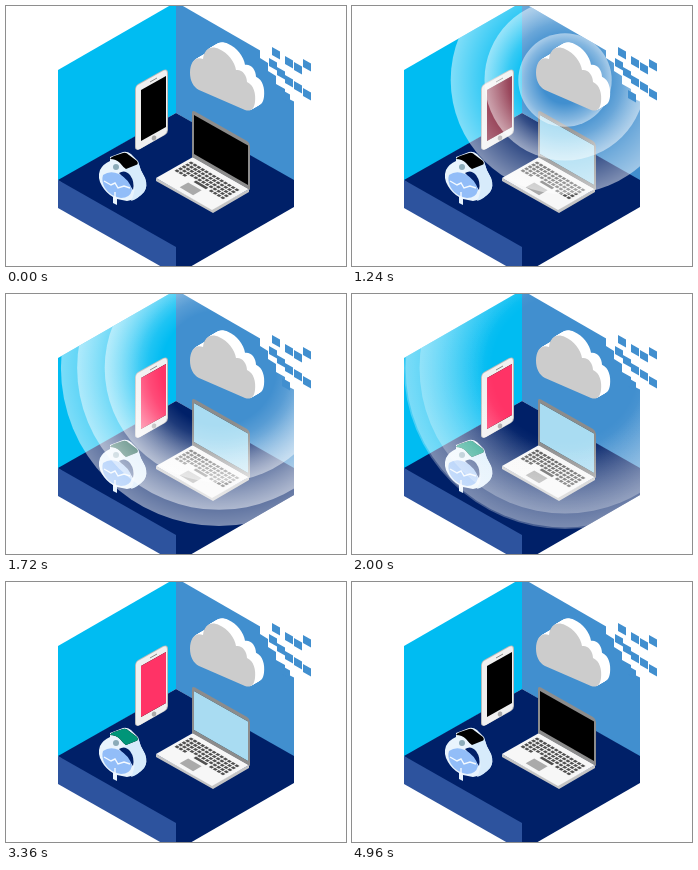
Animation of 340x260 px, one loop 5000 ms. Source, as an HTML page with a canvas:

```html
<!DOCTYPE html>
<html>
<head>
<meta charset="utf-8">
<style>
html, body { margin: 0; width: 100%; height: 100%; overflow: hidden; background: #fff; }
canvas { display: block; }
</style>
</head>
<body>
<canvas id="stage" width="340" height="260"></canvas>
<script>
const ctx = document.getElementById('stage').getContext('2d');
const LOOP = 5000, WAVE = { x: 213, y: 74, radius: 161 };
const WALL = '#418fcf', NAVY = '#002068';
const clamp = x => Math.max(0, Math.min(1, x));
const ramp = (t, from, to) => clamp((t - from) / (to - from));

function fill(path, color) {
  ctx.fillStyle = color;
  ctx.fill(new Path2D(path));
}

function line(path, color, width = 1) {
  ctx.strokeStyle = color;
  ctx.lineWidth = width;
  ctx.stroke(new Path2D(path));
}

// Black screen with its lit colour faded in and out
function screen(path, color, t, on, off, length) {
  fill(path, '#000');
  ctx.globalAlpha = ramp(t, on, on + length) - ramp(t, off, off + length);
  fill(path, color);
  ctx.globalAlpha = 1;
}

function room() {
  fill('M52 64L170-4V107L52 175Z', '#00bcf2');
  fill('M170-4L288 64V175L170 107Z', WALL);
  fill('M170 107L288 174V201L170 269L52 174Z', NAVY);
  fill('M52 174L170 241V269L52 202Z', '#2d539e');
}

function phone(t) {
  fill('M129 83Q129 80 132 78L157 64Q162 62 162 67V124Q162 127 159 129L134 143Q129 145 129 141Z', '#b9b9b9');
  fill('M130 83Q130 80 133 78.500L157 65Q161 63 161 67V124Q161 127 158 129L134 143Q130 145 130 141Z', '#f0f0f0');
  screen('M135 84L160 70V121L135 135Z', '#ff3366', t, 1080, 4040, 320);
  line('M144 76L151 72', '#888');
  ctx.beginPath();
  ctx.ellipse(148, 132, 2.2, 2.6, 0.3, 0, 7);
  ctx.fillStyle = '#aaa';
  ctx.fill();
}

function laptop(t) {
  fill('M150 172L206 203L243 183V186L207 207L150 175Z', '#c4c4c4');
  fill('M187 151L243 183L206 204L150 172Z', '#f7f7f7');
  ctx.save();
  ctx.transform(56, 33, -37, 21, 187, 151);
  ctx.fillStyle = '#505050';
  for (let row = 0; row < 5; row++)
    for (let col = 0; col < 13; col++)
      if (row < 4 || col < 3 || col > 8 || col === 5)
        ctx.fillRect(0.05 + col * 0.068, 0.13 + row * 0.095, row === 4 && col === 5 ? 0.22 : 0.05, 0.065);
  ctx.fillStyle = '#aaa';
  ctx.fillRect(0.35, 0.66, 0.24, 0.23);
  ctx.restore();
  fill('M186 107Q186 104 189 105.500L241 135Q244 137 244 140V184L186 151Z', '#8c8c8c');
  screen('M188 109L242 139.500V179L188 148Z', '#a9dcf2', t, 880, 3840, 300);
}

function watch(t) {
  fill('M104 151L117 146Q121 145 125 148L132 155Q134 164 139 172Q142 180 138 186Q132 193 121 195L111 193V199L107 197V191Q100 187 96 180Q91 172 94 164Q97 158 104 155Z', '#e9f4fd');
  fill('M132 156Q134 164 139 172Q142 180 138 186Q132 193 125 195Q132 181 125 171Q120 167 119 163Z', '#d7ebfb');
  fill('M113 167Q119 163 124 169Q129 176 127 184Q122 176 113 167Z', NAVY);
  fill('M97 169Q104 164 113 168Q124 174 126 184Q124 192 115 192Q104 190 99 182Q95 175 97 169Z', '#92bdf8');
  line('M98 175L105 179L109 177L112 182L118 180L124 182M109 186V193', '#f4faff', 1.4);
  screen('M104 153Q105 151 108 150L117 147Q120 146 123 149L131 155Q133 158 130 159L120 163Q117 161 114 157Q110 153 104 153Z', '#009578', t, 1560, 4520, 320);
  ctx.beginPath();
  ctx.arc(110, 161, 3, 0, 7);
  ctx.fillStyle = '#8babb9';
  ctx.fill();
}

function waves(t) {
  const opacity = t < 1700 ? 1 : t < 2320 ? 1 - 0.9 * ramp(t, 1700, 2320) : 0.1 * (1 - ramp(t, 2320, 2840));
  ctx.save();
  ctx.clip(new Path2D('M52 64L170-4L288 64V201L170 269L52 202Z'));
  ctx.globalAlpha = opacity;
  for (let ring = 0; ring < 3; ring++) {
    const p = ramp(t - ring * 240, 130, 1870);
    const r = WAVE.radius * (1 - Math.cos(Math.PI * p)) / 2;
    if (r < 1) continue;
    const glow = ctx.createRadialGradient(WAVE.x, WAVE.y, r * 0.5, WAVE.x, WAVE.y, r);
    glow.addColorStop(0, 'rgba(255,255,255,0)');
    glow.addColorStop(1, 'rgba(255,255,255,.5)');
    ctx.fillStyle = glow;
    ctx.beginPath();
    ctx.arc(WAVE.x, WAVE.y, r, 0, 7);
    ctx.fill();
  }
  ctx.restore();
}

function tiles() {
  fill('M254 43V52L262 57V65L270 70V78L279 83V91L289 96V62Z', '#fff');
  const corners = [[266, 41], [263, 52], [271, 61], [279, 50], [288, 56], [297, 53], [279, 69], [288, 75], [276, 84], [297, 82]];
  for (const [x, y] of corners) fill(`M${x} ${y}l8 4.600v8l-8-4.600Z`, WALL);
}

function cloud() {
  const face = 'M184 67C184 55 190 50 197 53C198 43 205 39 213 43C222 47 229 56 230 64C236 63 241 69 241 76C248 79 250 88 249 96C248 103 245 106 239 104L193 84C187 81 184 74 184 67Z';
  for (let depth = 9; depth >= 0; depth--) {
    ctx.save();
    ctx.translate(depth, -depth * 0.58);
    fill(face, depth ? '#fff' : '#ccc');
    ctx.restore();
  }
}

function draw(now) {
  const t = Math.floor(now % LOOP / 40) * 40;
  ctx.fillStyle = '#fff';
  ctx.fillRect(0, 0, 340, 260);
  room();
  phone(t);
  laptop(t);
  watch(t);
  waves(t);
  tiles();
  cloud();
  requestAnimationFrame(draw);
}
requestAnimationFrame(draw);
</script>
</body>
</html>
```
